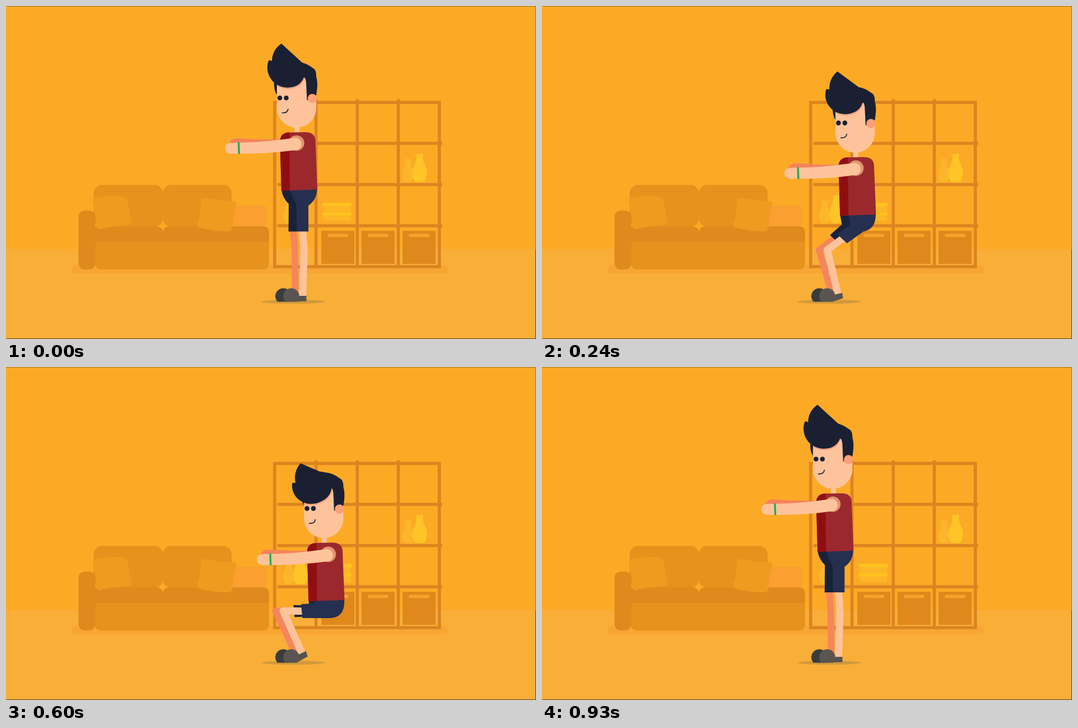
An HTML page that plays this animation: 943x594 px, repeating every 960 ms.

```html
<!DOCTYPE html>
<html lang="en">
<head>
<meta charset="utf-8">
<title>Squats</title>
<style>
  html, body { margin: 0; width: 100%; height: 100%; overflow: hidden; background: #fcaa26; }
  svg { display: block; width: 100%; height: 100%; }
  .skin { fill: #fec39b; }
  .hair { fill: #1a2032; }
  .cushion { fill: #e7921c; }
  .seat { fill: #e08a1d; }
  .pillow { fill: #ef9b20; }
  .leg { fill: none; stroke-linejoin: round; }
</style>
</head>
<body>
<svg viewBox="0 0 943 594" preserveAspectRatio="none">
  <defs>
    <clipPath id="faceClip"><use href="#face"/></clipPath>
    <path id="face" d="M482 138L505 128L536 126L552 140V182a35 35 0 0 1-70 0Z"/>
    <path id="quiff" d="M490 67L527 101L535 108L530 127Q523 146 499 145.500C477 144 465 126 465 110Q465 101 468 96.500L473 98Q474 78 490 67Z"/>
    <path id="dome" d="M497 527.500A14.300 14.300 0 1 1 518 527.500Z"/>
    <path id="bigVase" d="M729 264h14l-1.500 5C741 280 749 285 749 298Q748 314 740 314h-8Q724 314 723 298C723 285 731 280 730.500 269Z"/>
    <path id="smallVase" d="M709 273h12l-1.500 5C719 287 725 292 725 301Q724 314 718 314h-6Q706 314 705.500 301C705.500 292 711 287 710.500 278Z"/>
    <g id="vases">
      <use href="#smallVase" fill="#fcb62c"/>
      <use href="#bigVase" fill="#ffc425"/>
    </g>
    <g id="box">
      <rect x="561" y="401" width="59" height="59" fill="#df891c"/>
      <rect x="572" y="406.500" width="37" height="5.500" rx="2.750" fill="#f6a42b"/>
    </g>
  </defs>

  <rect width="943" height="594" fill="#fcaa26"/>
  <rect y="433.500" width="943" height="161" fill="#f9ae38"/>
  <rect x="117" y="462" width="669" height="15" rx="7.500" fill="#f8a633"/>

  <g fill="#fa9f30">
    <rect x="398" y="356" width="66" height="12.500" rx="6"/>
    <rect x="398" y="368" width="66" height="12.500" rx="6"/>
    <rect x="398" y="380" width="66" height="13" rx="6"/>
  </g>
  <rect class="cushion" x="156" y="319" width="123" height="75" rx="15"/>
  <rect class="cushion" x="279" y="319" width="122.500" height="75" rx="15"/>
  <rect class="cushion" x="158.500" y="410" width="309.500" height="60" rx="10"/>
  <path class="seat" d="M159 421V393H268Q279 394 279 405Q279 394 290 393H457Q468 393 468 404V421Z"/>
  <rect class="seat" x="129" y="365" width="30" height="105" rx="11"/>
  <path class="pillow" d="M154 348Q154 343 160 342Q186 337 209 339.500Q215 340 216.500 346Q218 362 223 383Q224 390 217 391.500Q190 392 168 398Q162 399 161 393Q160 371 154 348Z"/>
  <path class="pillow" d="M347 347Q348 342 354 342.500Q380 348 405 348Q411 349 410.500 355Q404 375 403 395Q402 401 396 402Q370 402 346 396Q340 395 341 388Q347 368 347 347Z"/>

  <use href="#vases"/>
  <use href="#vases" x="-212" y="73.500"/>
  <path fill="#fdb626" d="M565.500 355H613.500V383H565.500Z"/>
  <path fill="#ffc21f" d="M563 351H615V357H563ZM563 368H615V373.500H563Z"/>
  <use href="#box"/>
  <use href="#box" x="71.500"/>
  <use href="#box" x="144.500"/>
  <path fill="none" stroke="#dc8420" stroke-width="5.600" d="M478 172H771V465H478ZM551.500 166.500V462M625 166.500V462M698 166.500V462M483 245H776M483 318.500H776M483 392H776"/>

  <ellipse cx="511.500" cy="527.500" rx="57" ry="3.500" fill="#d09a3b"/>

  <g id="farArm"><path fill="#f5825a" d="M396 248Q398 236 410 236C440 237 460 240 495 237V252H396Z"/></g>
  <path id="farLeg" class="leg" stroke="#f5855c" stroke-width="11.500"/>
  <path id="farShorts" fill="#19223b"/>
  <path id="leg" class="leg" stroke="#fec39b" stroke-width="13"/>
  <path id="shorts" fill="#252f4f"/>
  <use href="#dome" x="-14" fill="#393b3c"/>
  <path id="heel" fill="#55524f"/>
  <use href="#dome" fill="#5a5550"/>

  <g id="body">
    <rect class="skin" x="513.500" y="212" width="9" height="18"/>
    <path fill="#9b282d" d="M487.500 243Q487 226 504 225.500L534 225Q550 226 550.500 240L554 327.500L490 329.500Z"/>
    <path fill="#8f0f10" d="M487.500 243Q487 226 504 225.500L505 329L490 329.500Z"/>
    <path class="hair" d="M477 134Q476 150 482 159V134Z"/>
    <use href="#face" class="skin"/>
    <g clip-path="url(#faceClip)"><g transform="translate(1 2.500)"><use href="#quiff" class="quiff" fill="#f6a283"/></g></g>
    <path class="hair" d="M510 98L527 101C538 104 543 109 548 112C552 116 552 122 552 126C555 136 554 147 552 159L539 168H535.500L534 136Q533 127 529 127L505 130Z"/>
    <use href="#quiff" class="quiff hair"/>
    <circle cx="545" cy="165" r="8.200" fill="#fa9f78"/>
    <circle class="hair" cx="487.200" cy="164" r="4.300"/>
    <circle class="hair" cx="498.600" cy="164" r="4.300"/>
    <path fill="none" stroke="#1a2032" stroke-width="1.700" stroke-linecap="round" d="M491.500 190.500Q500.500 191.500 502 184"/>
  </g>
  <g id="arm">
    <circle cx="517" cy="244.500" r="13.800" fill="#e2946f"/>
    <path class="skin" d="M399.500 244C445 243.500 470 241 515 235a11 11 0 0 1 3 21.500C480 262 450 264 399.500 263.500a9.750 9.750 0 0 1 0-19.500Z"/>
    <path fill="#1fab52" d="M412.300 243L415.500 242.800L416.300 264L413 264.200Z"/>
  </g>

  <path fill="none" stroke="#a87419" d="M0 .5H943M942.500 0V434"/>
  <path fill="none" stroke="#5a4314" d="M942.500 434V594M0 593.500H943"/>
</svg>
<script>
const LOOP = 960, TURN = 540, STEP = 30, DROP = 94;
const $ = id => document.getElementById(id);
const setPath = (id, d) => $(id).setAttribute("d", d);
const move = (id, x, y) => $(id).setAttribute("transform", `translate(${x} ${y})`);
const quiffs = document.querySelectorAll(".quiff");

// cubic-bezier(a, 0, b, 1)
function ease(s, a, b) {
  let lo = 0, hi = 1, u = s;
  for (let i = 0; i < 24; i++) {
    u = (lo + hi) / 2;
    const x = 3 * u * (1 - u) * (a * (1 - u) + b * u) + u ** 3;
    if (x < s) lo = u; else hi = u;
  }
  return u * u * (3 - 2 * u);
}

// How far down the squat is, 0 to 1
const squat = t => t < TURN
  ? ease(t / TURN, 0.38, 0.51)
  : 1 - ease((t - TURN) / (LOOP - TURN), 0.42, 0.06);

// Knee slides forward, the thigh swings up, the hem turns with it
function legPose(p, restX, forward, hemWidth) {
  const bend = p ** 0.72;
  const thigh = (100 * bend - 5) * Math.PI / 180, hem = p * Math.PI / 2;
  const knee = [restX - forward * bend, 435];
  const along = r => [knee[0] + r * Math.sin(thigh), knee[1] - r * Math.cos(thigh)];
  const [x, y] = along(33);
  const edge = k => [x + k * hemWidth * Math.cos(hem), y + k * hemWidth * Math.sin(hem)];
  return { knee, top: along(40), front: edge(-0.5), back: edge(0.5) };
}

function draw(t) {
  const p = squat(t);
  const sway = Math.sin(Math.PI * (t / LOOP) ** 2) ** 2; // follow-through, strongest on the way up
  const dx = 47 * (1 - (1 - p) ** 3) + 1.5 * sway, dy = DROP * p;
  const armX = dx + 5 * p * p + 4 * sway, armY = dy + 1.5 * sway;
  const lean = p ** 1.4 + 0.25 * sway;
  const hip = (x, y) => [x + dx, y + dy];

  move("body", dx, dy);
  move("arm", armX, armY);
  move("farArm", armX, armY);
  for (const q of quiffs) {
    q.setAttribute("transform", `translate(530 122) matrix(1 ${-0.29 * lean} ${0.23 * lean} ${1 - 0.05 * lean} 0 0) translate(-530 -122)`);
  }

  const near = legPose(p, 530.5, 39, 21 + 4 * p);
  const far = legPose(p, 514, 36, 17 + 5 * p);
  const heelTop = [534.5 - p, 517 - 11 * p], heelBase = [534.5 + 2.5 * p, 526.5 - 11 * p];

  setPath("farLeg", `M${far.top}L${far.knee}L514.500 510`);
  setPath("leg", `M${near.top}L${near.knee}L${heelTop[0] - 7} ${heelTop[1] + 4}`);
  setPath("heel", `M512 517L${heelTop}L${heelBase}L518 527H510Z`);
  setPath("farShorts", `M${hip(490, 328)}Q${hip(493, 344)} ${hip(503 - 20 * p, 353 - 17 * p)}
    L${far.front}L${far.back}L${hip(522 - 37 * p, 370 - 14 * p)}L${hip(520, 328)}Z`);
  setPath("shorts", `M${hip(505, 328)}L${hip(553.5, 326)}
    Q${hip(553 + 3 * p, 346 + 15 * p)} ${hip(538 - 14 * p, 356 + 4 * p)}
    L${near.back}L${near.front}L${hip(517 - 19 * p, 356 - 24 * p)}Z`);
}

const start = performance.now();
function tick() {
  const t = (performance.now() - start) % LOOP;
  draw(Math.floor(t / STEP) * STEP);
  requestAnimationFrame(tick);
}
tick();
</script>
</body>
</html>
```
